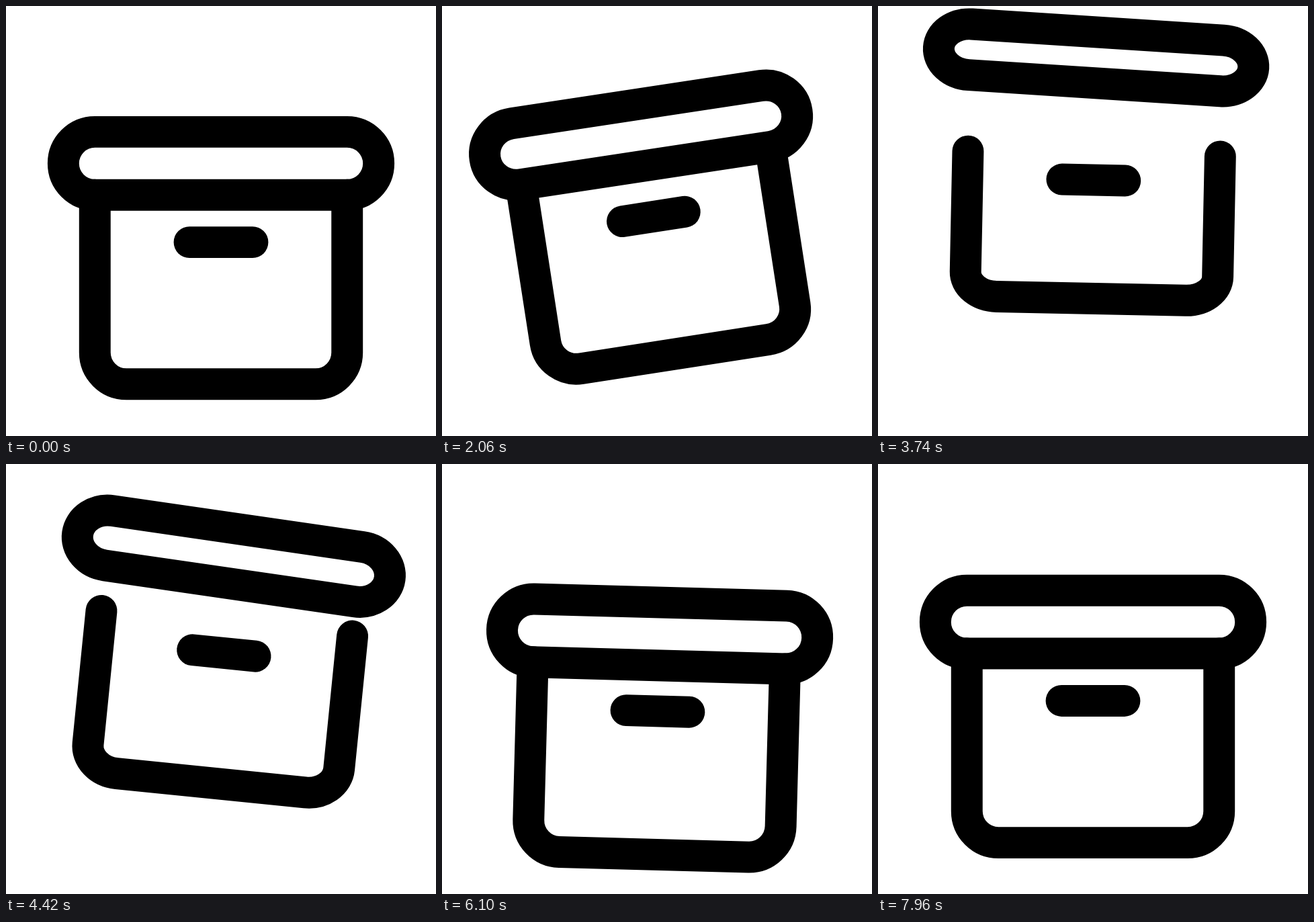
An HTML page with a canvas for the animation above (8000 ms loop, 640 by 640 pixels).

```html
<!DOCTYPE html>
<html lang="en">
<head>
<meta charset="utf-8">
<title>Archive box</title>
<style>
  html, body { margin: 0; width: 100%; height: 100%; overflow: hidden; background: #fff; }
  canvas { display: block; width: 100%; height: 100%; }
</style>
</head>
<body>
<canvas id="stage" width="640" height="640"></canvas>
<script>
const ctx = document.getElementById('stage').getContext('2d');
const LOOP = 8000;
const START = 500;
const UNIT = 640 * 0.88 / 24;

// Everything is placed from a pivot inside the box.
const PIVOT_X = 320;
const PIVOT_Y = 384.8;
const FLOOR = 178;
const LID_GAP = 150.5;
const HANDLE_GAP = 33.2;

// The motion is held on a repeating five-beat rhythm.
const CYCLE = 560;
const BEATS = [0, 140, 260, 380, 520];
const BEAT_SHIFT = 120;

// Each track: [time, value, slow start of the move to this key]
const TRACKS = {
  height: [[380, 0], [3490, -88, 1.27], [6290, 20], [6600, 20], [8150, 0]],
  swing: [[380, 0], [1850, -9], [5200, 8.1], [6450, 0]],
  squash: [[1780, 0], [3200, 0.235], [3800, 0.235], [5350, 0]],
  open: [[1760, 0], [3540, 74.5], [5320, 0]],
  tilt: [[1800, 0], [3300, 2.5], [4400, 2.5], [5900, 0]],
  lift: [[1850, 0], [5200, 11.8], [6450, 0]]
};

const clamp = u => Math.min(1, Math.max(0, u));
const smooth = u => u * u * (3 - 2 * u);

function valueAt(keys, t) {
  let value = keys[0][1];
  for (let i = 1; i < keys.length; i++) {
    const [from, a] = keys[i - 1];
    const [to, b, slow = 1] = keys[i];
    value += (b - a) * smooth(clamp((t - from) / (to - from)) ** slow);
  }
  return value;
}

function poseAt(t) {
  const pose = {};
  for (const name in TRACKS) pose[name] = valueAt(TRACKS[name], t);
  return pose;
}

function heldTime(t) {
  if (t < START) return 0;
  const phase = (t - BEAT_SHIFT) % CYCLE;
  return t - phase + BEATS.filter(b => b <= phase).pop();
}

const turn = degrees => ctx.rotate(degrees * Math.PI / 180);

// Only the path is transformed; the line keeps its weight.
function strokePath(pose, y, tilt, stretch, build) {
  ctx.save();
  ctx.translate(PIVOT_X, PIVOT_Y + pose.height);
  turn(pose.swing);
  ctx.translate(0, y);
  turn(tilt);
  ctx.scale(1, stretch);
  ctx.beginPath();
  build();
  ctx.restore();
  ctx.stroke();
}

function lidPath() {
  ctx.roundRect(-10 * UNIT, -2 * UNIT, 20 * UNIT, 4 * UNIT, 2 * UNIT);
}

function bodyPath() {
  const side = 8 * UNIT, r = 2 * UNIT, top = FLOOR - 12 * UNIT;
  ctx.moveTo(-side, top);
  ctx.lineTo(-side, FLOOR - r);
  ctx.arc(r - side, FLOOR - r, r, Math.PI, Math.PI / 2, true);
  ctx.lineTo(side - r, FLOOR);
  ctx.arc(side - r, FLOOR - r, r, Math.PI / 2, 0, true);
  ctx.lineTo(side, top);
}

function handlePath() {
  ctx.moveTo(-2 * UNIT, 0);
  ctx.lineTo(2 * UNIT, 0);
}

function draw(t) {
  const pose = poseAt(heldTime(t));
  ctx.fillStyle = '#fff';
  ctx.fillRect(0, 0, 640, 640);
  ctx.strokeStyle = '#000';
  ctx.lineWidth = 2 * UNIT;
  ctx.lineCap = ctx.lineJoin = 'round';
  strokePath(pose, -LID_GAP - pose.open, pose.tilt, 1 - 0.82 * pose.squash, lidPath);
  strokePath(pose, 0, 0, 1 - pose.squash, bodyPath);
  strokePath(pose, -HANDLE_GAP - pose.lift, 0, 1, handlePath);
}

function tick() {
  draw(performance.now() % LOOP);
  requestAnimationFrame(tick);
}
tick();
</script>
</body>
</html>
```
